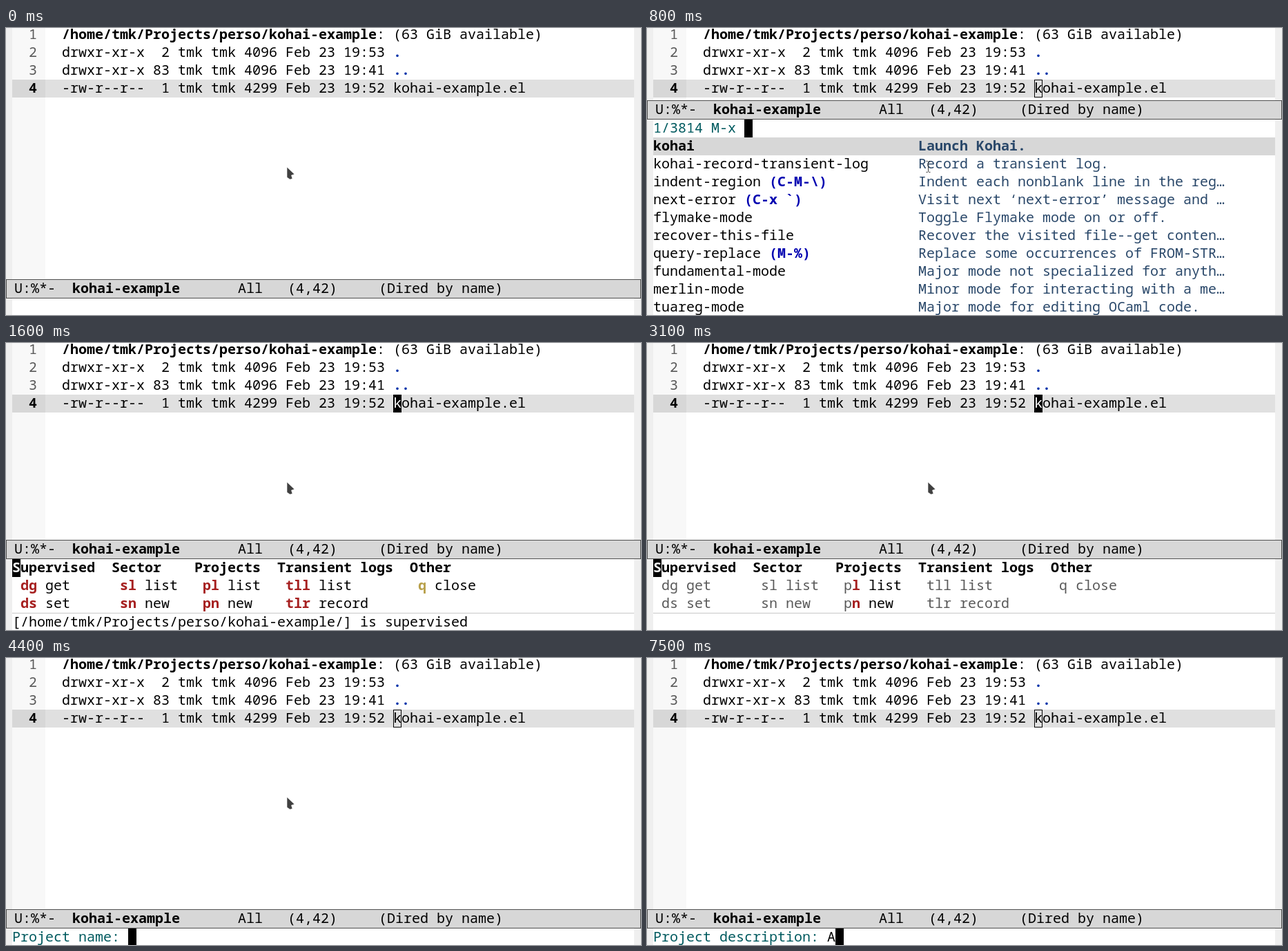
An HTML page for the animation above (8 s loop, 920 px wide and 417 px high).

```html
<!DOCTYPE html>
<html lang="en">
<head>
<meta charset="utf-8">
<title>Project prompt</title>
<style>
  html, body { margin: 0; width: 100%; height: 100%; overflow: hidden; background: #fff; }
  svg { display: block; width: 920px; height: 417px; }
  text {
    font: 20px "Noto Sans Mono", "DejaVu Sans Mono", monospace;
    font-variant-ligatures: none;
    white-space: pre;
    fill: #000;
  }
  .b { font-weight: 700; }
  .num, .off { fill: #595959; }
  .dir { fill: #0031a9; font-weight: 700; }
  .bind { fill: #0000b0; font-weight: 700; }
  .doc { fill: #2a486a; }
  .docb { fill: #2a486a; font-weight: 700; }
  .prompt { fill: #005a5f; }
  .key { fill: #a62020; font-weight: 700; }
  .quit { fill: #b8a04a; font-weight: 700; }
  .inv { fill: #fff; }
  .invb { fill: #fff; font-weight: 700; }
</style>
</head>
<body>
<svg id="stage" viewBox="0 0 920 417"></svg>
<script>
const CW = 12, LH = 26, LEFT = 9, LOOP = 8000;
const stage = document.getElementById('stage');

// time, view, cursor lit, typed text
const steps = [
  [0, 'idle', 0], [400, 'idle', 1],
  [800, 'mx', 1], [1300, 'mx', 0],
  [1600, 'menu', 1], [2100, 'menu', 0], [2600, 'menu', 1],
  [3100, 'sub', 1],
  [3400, 'name', 1, ''], [3900, 'name', 0, ''], [4400, 'name', 1, ''], [4900, 'name', 0, ''],
  [5000, 'name', 1, 'k'], [5200, 'name', 1, 'ko'], [5400, 'name', 1, 'koh'],
  [5500, 'name', 1, 'koha'], [5600, 'name', 1, 'kohai'], [6100, 'name', 0, 'kohai'],
  [6200, 'desc', 1, ''], [6700, 'desc', 0, ''], [7200, 'desc', 1, ''],
  [7500, 'desc', 1, 'A']
];

const prompts = { name: 'Project name: ', desc: 'Project description: ' };

const commands = [
  ['kohai', '', 'Launch Kohai.'],
  ['kohai-record-transient-log', '', 'Record a transient log.'],
  ['indent-region', '(C-M-\\)', 'Indent each nonblank line in the reg…'],
  ['next-error', '(C-x `)', 'Visit next ‘next-error’ message and …'],
  ['flymake-mode', '', 'Toggle Flymake mode on or off.'],
  ['recover-this-file', '', 'Recover the visited file--get conten…'],
  ['query-replace', '(M-%)', 'Replace some occurrences of FROM-STR…'],
  ['fundamental-mode', '', 'Major mode not specialized for anyth…'],
  ['merlin-mode', '', 'Minor mode for interacting with a me…'],
  ['tuareg-mode', '', 'Major mode for editing OCaml code.']
];

// column, title, then key/label pairs
const groups = [
  [0, 'Supervised', ['dg', 'get'], ['ds', 'set']],
  [12, 'Sector', ['sl', 'list'], ['sn', 'new']],
  [22, 'Projects', ['pl', 'list'], ['pn', 'new']],
  [32, 'Transient logs', ['tll', 'list'], ['tlr', 'record']],
  [48, 'Other', ['q', 'close']]
];

const rect = (x, y, w, h, fill) =>
  `<rect x="${x}" y="${y}" width="${w}" height="${h}" fill="${fill}"/>`;
const frame = (x, y, w, h, stroke, fill = 'none') =>
  `<rect x="${x + .5}" y="${y + .5}" width="${w - 1}" height="${h - 1}" stroke="${stroke}" fill="${fill}"/>`;
const text = (x, top, str, cls = '') =>
  `<text x="${x}" y="${top + 19}" class="${cls}">${str}</text>`;
const cell = (col, top, str, cls) => text(LEFT + col * CW, top, str, cls);
const block = (col, top) => rect(LEFT + col * CW, top, CW, LH, '#000');

function listing(bottom) {
  const rows = [
    'drwxr-xr-x  2 tmk tmk 4096 Feb 23 19:53',
    'drwxr-xr-x 83 tmk tmk 4096 Feb 23 19:41',
    '-rw-r--r--  1 tmk tmk 4299 Feb 23 19:52 kohai-example.el'
  ];
  let out = rect(LEFT, 0, 48, bottom, '#f8f8f8')
    + rect(LEFT, 75, 48, LH, '#d7d7d7') + rect(57, 75, 853, LH, '#e0e0e0');
  for (let i = 0; i < 4; i++) out += cell(2, i * LH - 3, i + 1, i < 3 ? 'num' : 'b');
  out += cell(6, -3, '/home/tmk/Projects/perso/kohai-example', 'b')
    + cell(44, -3, ': (63 GiB available)');
  rows.forEach((row, i) => out += cell(6, 23 + i * LH, row));
  return out + cell(46, 23, '.', 'dir') + cell(46, 49, '..', 'dir');
}

function modeLine(y) {
  const parts = [[0, 'U:%*-'], [7, 'kohai-example', 'b'], [27, 'All'], [33, '(4,42)'], [44, '(Dired by name)']];
  return frame(0, y, 920, 28, '#505050', '#d7d7d7')
    + parts.map(([col, str, cls]) => text(12 + col * CW, y + 1, str, cls)).join('');
}

function commandList(lit) {
  let out = cell(0, 133, '1/3814 M-x', 'prompt') + rect(LEFT, 159, 901, LH, '#d7d7d7');
  if (lit) out += block(11, 133);
  commands.forEach(([name, bind, doc], i) => {
    const y = 159 + i * LH;
    out += cell(0, y, name, i ? '' : 'b') + cell(32, y, doc, i ? 'doc' : 'docb');
    if (bind) out += cell(name.length + 1, y, bind, 'bind');
  });
  return out;
}

function menu(sub) {
  let out = '';
  for (const [col, title, ...items] of groups) {
    out += cell(col, 314, title, 'b');
    items.forEach(([key, label], i) => {
      const y = 340 + i * LH, at = col + 1;
      const active = !sub || key[0] === 'p';
      const keyClass = !active ? 'off' : key === 'q' ? 'quit' : 'key';
      out += sub && active
        ? cell(at, y, key[0], 'off') + cell(at + 1, y, key.slice(1), 'key')
        : cell(at, y, key, keyClass);
      out += cell(at + key.length + 1, y, label, active ? '' : 'off');
    });
  }
  out += block(0, 314) + cell(0, 314, 'S', 'invb') + rect(LEFT, 392, 901, 1, '#c8c8c8');
  return sub ? out : out + cell(0, 393, '[/home/tmk/Projects/perso/kohai-example/] is supervised');
}

function prompt(label, input, lit) {
  const out = cell(0, 393, label, 'prompt') + cell(label.length, 393, input);
  return lit ? out + block(label.length + input.length, 393) : out;
}

const arrow = '<path d="M407 202L418 212.5L413.5 214L415 219L411.5 220L407 217Z" fill="#404040" stroke="#fff" stroke-width=".6"/>';
const beam = '<path d="M404.5 193.5h2l1 1 1-1h2M407.5 194.5v14M404.5 209.5h2l1-1 1 1h2" fill="none" stroke="#404040"/>';

function draw([, view, lit, input = '']) {
  const isMenu = view === 'menu' || view === 'sub';
  const inMini = view === 'mx' || view in prompts;
  const modeY = view === 'mx' ? 105 : isMenu ? 286 : 365;
  let out = rect(0, 0, 920, 417, '#fff') + rect(0, 0, LEFT, 417, '#efefef')
    + rect(910, 0, 10, 417, '#efefef') + listing(modeY);
  if (inMini) out += frame(561, 75, CW, LH, '#000');
  else if (lit) out += block(46, 75) + cell(46, 75, 'k', 'inv');
  out += modeLine(modeY);
  if (view === 'mx') out += commandList(lit) + beam;
  else if (isMenu) out += menu(view === 'sub');
  else if (inMini) out += prompt(prompts[view], input, lit);
  if (view === 'idle' || isMenu || (view === 'name' && !input)) out += arrow;
  stage.innerHTML = out;
}

let shown = null;
const start = performance.now();
function tick() {
  const t = (performance.now() - start) % LOOP;
  const step = steps.findLast(s => s[0] <= t);
  if (step !== shown) draw(shown = step);
  requestAnimationFrame(tick);
}
tick();
</script>
</body>
</html>
```
